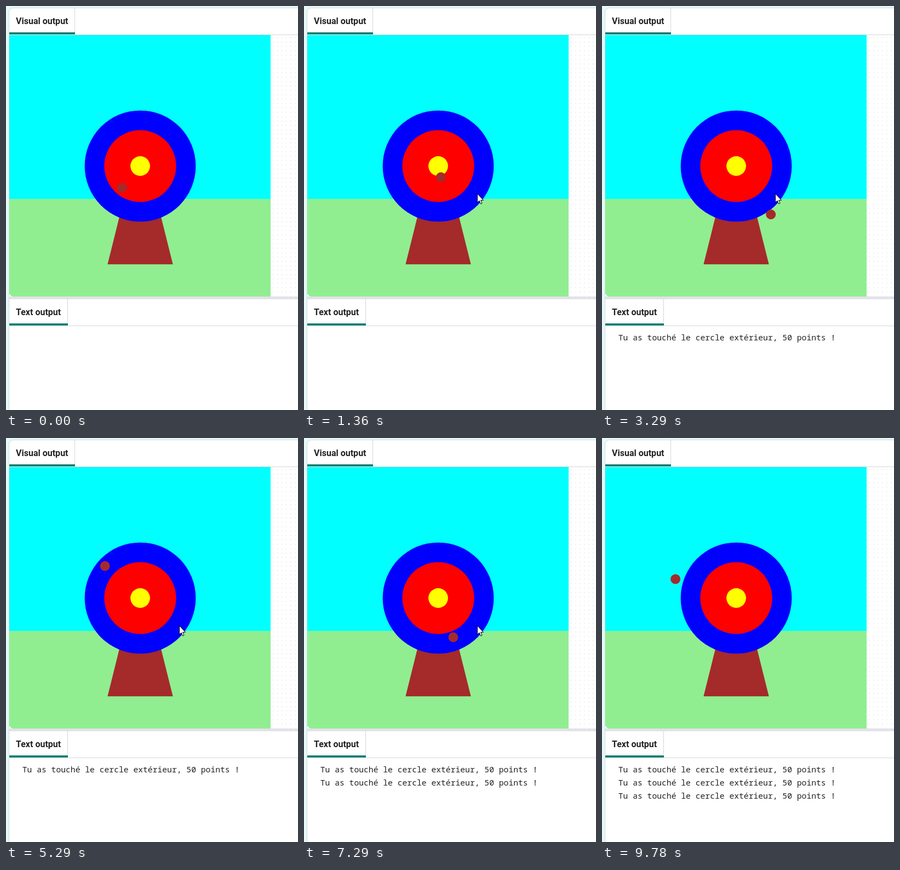
An HTML page for the animation above (9910 ms loop, 533x737 px).

```html
<!DOCTYPE html>
<html lang="fr">
<head>
<meta charset="utf-8">
<title>Target game</title>
<style>
  html, body { margin: 0; width: 100%; height: 100%; overflow: hidden; }
  svg { display: block; }
  .tab { font: 700 16px Roboto, sans-serif; fill: #212121; }
  .log { font: 14.7px "Noto Sans Mono", monospace; fill: #212121; }
</style>
</head>
<body>
<svg width="533" height="737" viewBox="0 0 533 737">
  <defs>
    <pattern id="dots" x="483" y="53" width="8" height="8" patternUnits="userSpaceOnUse">
      <rect x="4" y="4" width="1.5" height="1.5" fill="#e4e4e4"/>
    </pattern>
    <clipPath id="canvas"><path d="M6 53H483V530H14a8 8 0 0 1-8-8Z"/></clipPath>
  </defs>
  <rect width="533" height="737" fill="#e6f8f8"/>
  <path d="M5.5 740V11.5a8 8 0 0 1 8-8H540V740Z" fill="#fff" stroke="#d3d9d9"/>
  <path d="M126 52.5H533M125.5 4V52M113 583.5H533M112.5 535V583" stroke="#d3d6d6"/>
  <path d="M6 48H126V52H6ZM6 579H113V583H6Z" fill="#0f7f72"/>
  <rect x="483" y="53" width="50" height="477" fill="url(#dots)"/>
  <rect x="6" y="530" width="527" height="5" fill="#e3e1e9"/>
  <text class="tab" x="18" y="33">Visual output</text>
  <text class="tab" x="18" y="564">Text output</text>

  <g clip-path="url(#canvas)">
    <!-- The sketch itself is 400 units wide -->
    <g transform="translate(6.5 53.5) scale(1.1925)">
      <rect x="-1" y="-1" width="402" height="402" fill="#0ff"/>
      <rect x="-1" y="250.3" width="402" height="151" fill="#90ee90"/>
      <path d="M150 350.4L200 150L250 350.4Z" fill="#a52a2a"/>
      <circle cx="200" cy="200" r="85" fill="#00f"/>
      <circle cx="200" cy="200" r="55" fill="#f00"/>
      <circle cx="200" cy="200" r="15" fill="#ff0"/>
      <circle id="arrow" r="7.5" fill="#a52a2a"/>
    </g>
  </g>
  <g id="log"></g>
  <path id="cursor" d="M.5 .5V16.5L4 13.2L6.5 19L9 18L6.6 12.3H11.5Z" fill="#fff" stroke="#000"/>
</svg>
<script>
const LOOP = 9910, TICK = 1000 / 15, TICKS_PER_SHOT = 7.43;
// Where each arrow lands, in sketch units
const shots = [
  [172, 233], [138, 104], [247, 168], [204, 217], [259, 112], [144, 258], [214, 278],
  [253, 274], [227, 230], [288, 231], [284, 182], [146, 151], [280, 202], [281, 136],
  [106, 121], [223, 260], [237, 280], [136, 157], [166, 135], [234, 116], [107, 171]
];
const clicks = [2760, 5360, 7690];
const rest = [316, 342];

const byId = id => document.getElementById(id);
const arrow = byId('arrow'), cursor = byId('cursor'), log = byId('log');
const place = (el, [x, y]) => el.setAttribute('transform', `translate(${x} ${y})`);
const show = (el, on) => el.setAttribute('visibility', on ? 'visible' : 'hidden');
const progress = (t, start, end) => Math.min(1, Math.max(0, (t - start) / (end - start)));
const curve = (from, via, to, u) =>
  from.map((a, i) => (1 - u) ** 2 * a + 2 * u * (1 - u) * via[i] + u * u * to[i]);

log.innerHTML = clicks.map((_, i) =>
  `<text class="log" x="29.7" y="${610 + 24 * i}">Tu as touché le cercle extérieur, 50 points !</text>`).join('');

function pointer(t) {
  if (t > 9180) return curve(rest, [430, 180], [455, 6], progress(t, 9180, 9640));
  const u = progress(t, 70, 620);
  return curve([404, 30], [410, 305], rest, 1 - (1 - u) ** 1.5);
}

function draw(now) {
  const t = now % LOOP;
  const tick = Math.floor((t - 18) / TICK);
  place(arrow, shots[Math.floor((tick + 3.164) / TICKS_PER_SHOT)]);
  clicks.forEach((at, i) => show(log.children[i], t >= at));
  show(cursor, t >= 70 && t < 9640);
  place(cursor, pointer(t));
  requestAnimationFrame(() => draw(performance.now()));
}
draw(0);
</script>
</body>
</html>
```
